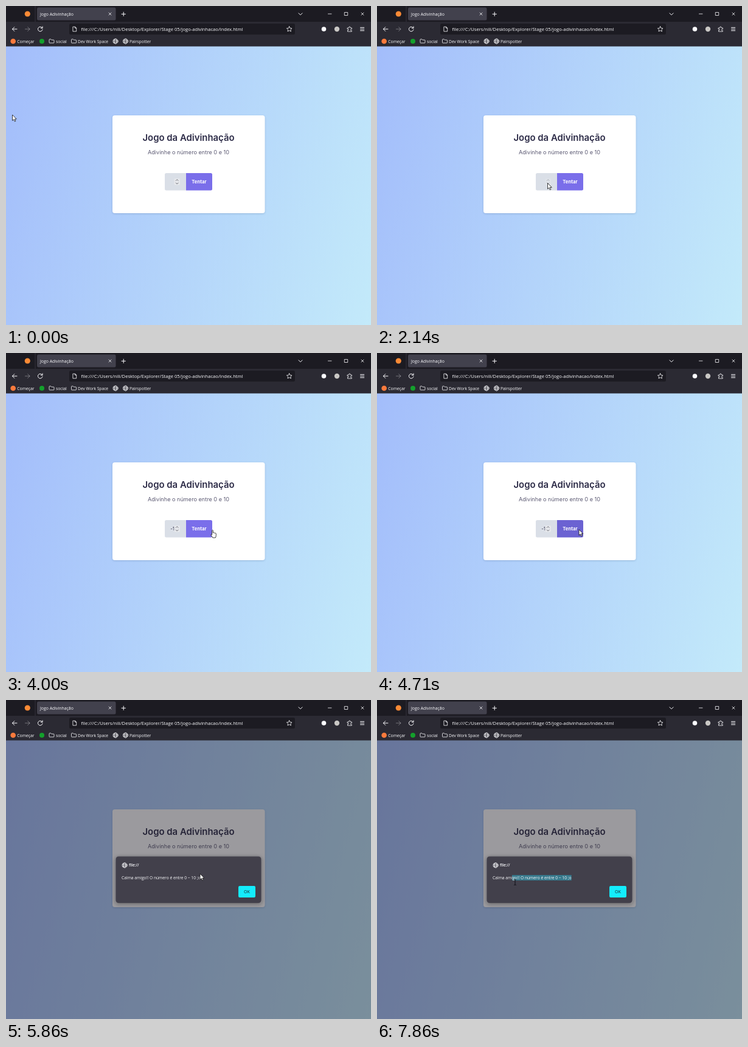
An HTML page that plays this animation: 600 px wide and 525 px high, repeating every 8 s.

```html
<!DOCTYPE html>
<html lang="pt-BR">
<head>
<meta charset="utf-8">
<title>Jogo Adivinhação</title>
<style>
  html, body { margin: 0; width: 100%; height: 100%; overflow: hidden; background: #2b2a33; }
  svg { display: block; width: 100vw; height: 100vh; }
  text { white-space: pre; }
  .ui { font-family: "Open Sans", "Noto Sans", sans-serif; font-size: 6.8px; fill: #fbfbfe; }
  .page { font-family: Inter, "Open Sans", sans-serif; }
  .line { fill: none; stroke: #fbfbfe; stroke-width: 1; stroke-linecap: round; stroke-linejoin: round; }
  .thin { stroke-width: .8; }
  .arrow { fill: #fff; stroke: #111; stroke-width: .8; stroke-linejoin: round; }
</style>
</head>
<body>
<svg viewBox="0 0 600 525">
  <defs>
    <linearGradient id="sky" gradientUnits="userSpaceOnUse" x1="-37" y1="206" x2="637" y2="386">
      <stop offset="0" stop-color="#a3bdfb"/>
      <stop offset="1" stop-color="#c3eafa"/>
    </linearGradient>
    <filter id="soft" x="-10%" y="-10%" width="120%" height="125%">
      <feDropShadow dx="0" dy="1" stdDeviation="1.5" flood-color="#34507c" flood-opacity=".25"/>
    </filter>
    <filter id="deep" x="-10%" y="-20%" width="120%" height="150%">
      <feDropShadow dx="0" dy="1.5" stdDeviation="3" flood-color="#1c1b22" flood-opacity=".5"/>
    </filter>
    <g id="globe" class="line thin">
      <circle r="4"/>
      <ellipse rx="1.8" ry="4"/>
      <path d="M-3.8-1.3H3.8M-3.8 1.3H3.8"/>
    </g>
    <path id="folder" class="line thin" d="M-4-2.7q0-.7.7-.7h2.1l1.2 1.3h3.3q.7 0 .7.7v3.6q0 .7-.7.7h-6.6q-.7 0-.7-.7z"/>
    <path id="cross" class="line thin" d="M-2-2 2 2M2-2-2 2"/>
  </defs>

  <!-- Page -->
  <rect y="66" width="600" height="459" fill="url(#sky)"/>
  <rect x="175" y="180" width="250.5" height="161" rx="4" fill="#fff" filter="url(#soft)"/>
  <g class="page" text-anchor="middle">
    <text x="300" y="221.5" font-size="14.9" font-weight="600" fill="#2c2b47">Jogo da Adivinhação</text>
    <text x="300" y="243.7" font-size="9.15" fill="#5c5a73">Adivinhe o número entre 0 e 10</text>
    <path d="M296 275v28.5h-32.5q-2.5 0-2.5-2.5v-23.5q0-2.5 2.5-2.5z" fill="#dadfe7"/>
    <path id="button" d="M296 275h40.5q2.5 0 2.5 2.5v23.5q0 2.5-2.5 2.5h-40.5z"/>
    <text x="317.5" y="292" font-size="7.7" font-weight="700" fill="#fff">Tentar</text>
    <text id="guess" x="273.6" y="292.1" font-size="8" fill="#33324a">-1</text>
  </g>
  <g id="spinner">
    <rect x="276.5" y="284" width="9.5" height="10.5" rx="1" fill="#e6e8ec"/>
    <path d="m279 287.7 2.2-2.2 2.2 2.2m-4.4 3.1 2.2 2.2 2.2-2.2" fill="none" stroke="#5d5d66" stroke-width=".9"/>
  </g>

  <!-- Alert -->
  <g id="alert">
    <rect y="66" width="600" height="459" fill="#1c1b22" opacity=".44"/>
    <rect x="180.5" y="257.5" width="239" height="76.5" rx="4.5" fill="#42404c" filter="url(#deep)"/>
    <use href="#globe" x="195" y="272"/>
    <rect id="mark" y="288" height="9" fill="#37798c"/>
    <g class="ui">
      <text x="202" y="274.3" style="font-size:6.5px;font-weight:600">file://</text>
      <text x="190" y="295" style="font-size:6.7px">Calma amigo!! O número é entre 0 ~ 10 ;o</text>
      <rect x="382" y="306" width="28" height="19" rx="2.2" fill="#14ecfc"/>
      <text x="396" y="318.2" text-anchor="middle" style="font-size:7.1px;fill:#1c1b22">OK</text>
    </g>
  </g>

  <!-- Browser window -->
  <rect width="600" height="26" fill="#1c1b22"/>
  <rect y="26" width="600" height="40.5" fill="#2b2a33"/>
  <path d="M48 0v26" stroke="#34333d"/>
  <rect x="51" y="2.5" width="129.5" height="21" rx="2.5" fill="#42414d"/>
  <rect x="104" y="29" width="371" height="18" rx="2.5" fill="#1c1b22"/>
  <circle cx="35.3" cy="13" r="4.6" fill="#fb8a35"/>
  <circle cx="11.7" cy="58" r="4.3" fill="#fb7a3c"/>
  <circle cx="59" cy="58" r="4" fill="#14a02c"/>
  <circle cx="522.5" cy="38" r="3.8" fill="#fbfbfe"/>
  <circle cx="544" cy="38" r="4.2" fill="#c9c7c4"/>
  <g class="ui">
    <text x="56" y="15.7" style="font-size:6.9px">Jogo Adivinhação</text>
    <text x="123.5" y="40.8" style="font-size:7.64px">file:///C:/Users/nili/Desktop/Explorer/Stage 05/jogo-adivinhacao/index.html</text>
    <text x="18.3" y="60.5">Começar</text>
    <text x="82" y="60.5">social</text>
    <text x="118" y="60.5" style="font-size:6.7px">Dev Work Space</text>
    <text x="203" y="60.5">Pairspotter</text>
  </g>
  <use href="#folder" x="75" y="58"/>
  <use href="#folder" x="111.5" y="58"/>
  <use href="#globe" x="180" y="58"/>
  <use href="#globe" x="196.5" y="58"/>
  <use href="#cross" x="171" y="13"/>
  <use href="#cross" x="586" y="13"/>
  <g class="line">
    <path d="M190 13.3h6.4m-3.2-3.2v6.4M481 11.8l3 3 3-3"/>
    <path class="thin" d="M529.5 13h5.5M556.7 10.5h5v5h-5z"/>
    <path d="M18 38h-7.5m3.3-3.4-3.4 3.4 3.4 3.4"/>
    <path d="M31.5 38H39m-3.3-3.4 3.4 3.4-3.4 3.4" opacity=".35"/>
    <path d="M59.6 36.2a3.8 3.8 0 1 0 .4 2.6M60 33.8v2.7h-2.7"/>
    <path class="thin" d="M110.3 34.2h3.4l2 2v5.6h-5.4zm3.2.2v2h2"/>
    <path class="thin" d="m465.7 33.6 1.3 2.8 3 .4-2.2 2.1.6 3-2.7-1.5-2.7 1.5.6-3-2.2-2.1 3-.4z"/>
    <path class="thin" d="M561.5 36h2.2v-.9a1.1 1.1 0 0 1 2.2 0v.9h2.4v2.2h-.7a1.2 1.2 0 0 0 0 2.4h.7V42h-6.8v-2h.7a1 1 0 0 0 0-2h-.7z"/>
    <path d="M582.5 35.4h6.2m-6.2 2.6h6.2m-6.2 2.6h6.2"/>
  </g>

  <!-- Pointer shapes, hot spot at 0,0 -->
  <g id="pointer">
    <path id="arrow" class="arrow" d="M0 0v9.6l2.2-2 1.6 3.5 1.6-.8-1.6-3.3h3z"/>
    <path id="hand" class="arrow" d="M-.9 1q.9-1.4 1.8 0v4l.4-.1q1-.7 1.5.3 1.1-.6 1.6.4 1.3-.5 1.4.8v3q0 2-1 3.6h-4.6q-.8-1.8-2.9-4.6-.3-1.3 1.8-.3z"/>
    <path id="beam" d="M-1.8-4.5h1.2l.6.6.6-.6h1.2M0-4v8m-1.8.5h1.2l.6-.6.6.6h1.2" fill="none" stroke="#0b0b10" stroke-width=".9"/>
  </g>
</svg>
<script>
  const LOOP = 8000, STEP = 1000 / 7;   // screen refreshes seven times a second
  const $ = id => document.getElementById(id);
  const show = (id, on) => $(id).setAttribute('display', on ? 'inline' : 'none');

  // [tick, x, y]
  const path = [
    [0, 10.5, 179], [3, 62, 208], [4, 62, 208], [12, 279, 289],
    [15, 280.5, 291.5], [17, 280.5, 292], [23, 280.5, 292],
    [28, 339.5, 291], [31, 332, 290.5], [33, 332, 290.5],
    [34, 338, 296], [36, 338, 296], [41, 319, 286], [43, 320, 291],
    [44, 320, 291], [45, 320, 293], [48, 320, 293], [55, 227, 300]
  ];
  const markEnd = 319.7;

  const mix = (a, b, p) => a + (b - a) * p;

  function pointerAt(k) {
    const i = path.findIndex(p => p[0] >= k);
    if (i < 1) return path[0].slice(1);
    const [k0, x0, y0] = path[i - 1], [k1, x1, y1] = path[i];
    const p = (k - k0) / (k1 - k0);
    return [mix(x0, x1, p), mix(y0, y1, p)];
  }

  function shapeAt(k) {
    if (k >= 34) return k <= 36 || k >= 43 ? 'beam' : 'arrow';
    return k >= 25 && k < 33 ? 'hand' : 'arrow';
  }

  function draw(t) {
    const k = Math.min(55, Math.floor((t + 5) / STEP));
    const [x, y] = pointerAt(k), shape = shapeAt(k);
    $('pointer').setAttribute('transform', `translate(${x} ${y})`);
    for (const id of ['arrow', 'hand', 'beam']) show(id, id === shape);

    show('guess', k >= 20);
    show('alert', k >= 34);
    $('spinner').setAttribute('opacity', k >= 12 && k < 24 ? .45 : 1);
    $('button').setAttribute('fill', k === 33 ? '#6b62d2' : '#7a6eea');

    const from = mix(markEnd, 222, Math.max(0, (k - 48) / 7));
    $('mark').setAttribute('x', from);
    $('mark').setAttribute('width', markEnd - from);
  }

  function tick() {
    draw(performance.now() % LOOP);
    requestAnimationFrame(tick);
  }
  tick();
</script>
</body>
</html>
```
